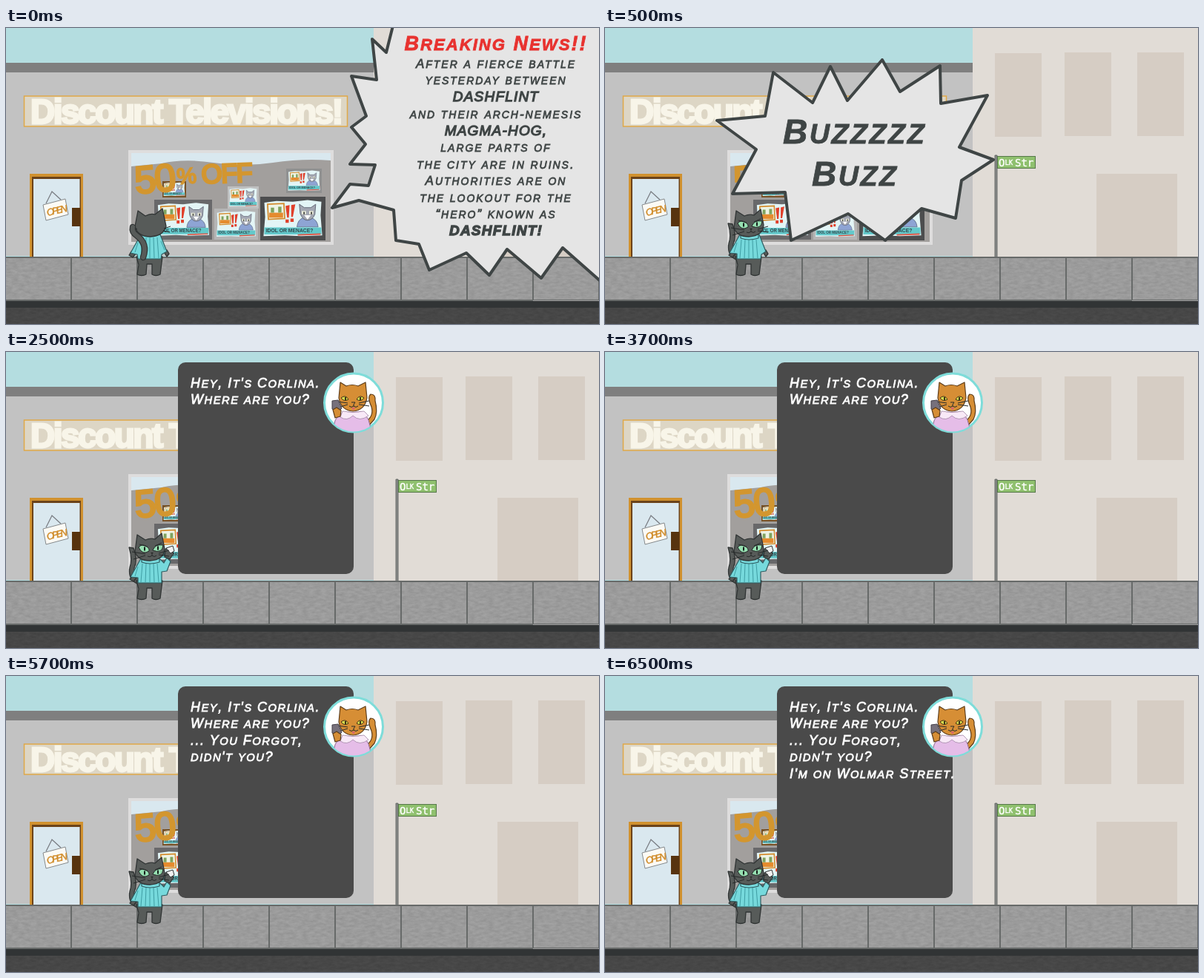
An HTML page for the animation above (8 s loop, 800x400 px).

```html
<!DOCTYPE html>
<html lang="en">
<head>
<meta charset="utf-8">
<title>Street comic</title>
<style>
html, body { margin: 0; width: 100%; height: 100%; overflow: hidden; background: #b4dde0; }
svg { display: block; width: 800px; height: 400px; }
text { font-family: "Liberation Sans", Arial, sans-serif; }
.comic { font-style: italic; letter-spacing: 1.5px; stroke-width: .8; }
.comic tspan { font-size: .82em; }
.mid { text-anchor: middle; }
.dark { fill: #3f4545; stroke: #3f4545; }
.body text { font-size: 17px; letter-spacing: 2px; }
.body .loud { font-size: 19px; letter-spacing: 1.2px; stroke-width: 1.3; }
.call text { font-size: 18px; fill: #fff; stroke: #fff; }
.burst { fill: #e5e5e5; stroke: #3f4545; stroke-width: 4; stroke-linejoin: round; }
.fur { fill: #575b59; stroke: #303434; stroke-width: 1.3; stroke-linejoin: round; }
.knit { fill: #76d9dc; stroke: #2e5c60; stroke-width: 1.2; stroke-linejoin: round; }
.rib { fill: none; stroke: #3f9da3; stroke-width: 1; }
.hair { fill: none; stroke: #262a2a; stroke-width: 1; }
.ginger { fill: #d68e35; stroke: #5d3d1b; stroke-width: 1.2; stroke-linejoin: round; }
.cut { animation: 8s step-end infinite; }
.news { animation-name: news; }
.awake { animation-name: awake; }
.buzz { animation-name: buzz; }
.talk { animation-name: talk; }
.second { animation-name: second; }
.third { animation-name: third; }
@keyframes news { 0% { opacity: 1 } 6.25%, 100% { opacity: 0 } }
@keyframes awake { 0% { opacity: 0 } 6.25%, 100% { opacity: 1 } }
@keyframes buzz { 0% { opacity: 0 } 6.25% { opacity: 1 } 31.25%, 100% { opacity: 0 } }
@keyframes talk { 0% { opacity: 0 } 31.25%, 100% { opacity: 1 } }
@keyframes second { 0% { opacity: 0 } 56.25%, 100% { opacity: 1 } }
@keyframes third { 0% { opacity: 0 } 81.25%, 100% { opacity: 1 } }
</style>
</head>
<body>
<svg viewBox="0 0 800 400" xmlns="http://www.w3.org/2000/svg">
  <defs>
    <filter id="grain" x="0" y="0" width="1" height="1">
      <feTurbulence type="fractalNoise" baseFrequency=".12 .3" numOctaves="4" seed="4"/>
      <feColorMatrix values="0 0 0 0 0  0 0 0 0 0  0 0 0 0 0  1 0 0 0 -.25"/>
    </filter>
    <clipPath id="round"><circle cx="469" cy="68.500" r="39"/></clipPath>
    <g id="show">
      <path d="M5 7L20 5 40 6 58 4 75 6 74 22 76 46 50 47 30 46 4 47 6 24Z" fill="#e3f5f6"/>
      <path d="M9 9L29 8 30 26 10 27Z" fill="#eef3e4" stroke="#d48b2c" stroke-width="1.600"/>
      <path d="M11 19h17v6H11Z" fill="#e58b2e"/>
      <path d="M13 13h4v6h-4ZM22 12h4v7h-4Z" fill="#7fa35e"/>
      <path d="M31 11l5-1-1 15h-2ZM38 10l5-1-3 15h-2ZM31 27h4v4h-4ZM37 26h4v4h-4Z" fill="#e0402b"/>
      <path d="M45 36q1-9 8-11h9q8 2 9 11Z" fill="#8ea4d4" stroke="#59667f" stroke-width=".7"/>
      <path d="M49 20L48 9l6 4h8l6-4-1 12q-3 7-9 7t-9-8Z" fill="#a3a7b2" stroke="#5b6070" stroke-width=".8"/>
      <path d="M54 22h8l-4 5Z" fill="#fff"/>
      <path d="M51 17h5v4h-5ZM60 17h5v4h-5Z" fill="#eef0dc"/>
      <path d="M53 18h1.500v3H53ZM62 18h1.500v3H62Z" fill="#333"/>
      <path d="M5 36.500H75V45H5Z" fill="#63c8ca"/>
      <text x="7" y="42.700" font-size="6.200" font-weight="bold" fill="#33474c">IDOL OR MENACE?</text>
      <path d="M46 45.500l28-1" stroke="#df5747" stroke-width="1.600"/>
    </g>
    <g id="legs">
      <path class="fur" d="M176 309L211 309 208 333Q202 336 197 333L197 319H190L189 333Q183 336 177 333L179 320Z"/>
    </g>
    <g id="face">
      <path class="fur" d="M174 270L177 247 188 254Q195 251 201 253L210 245 214 266Q213 281 194 282 178 282 174 270Z"/>
      <path d="M179 264q4-5 9-2 6 3 5 7-9 6-14-5ZM198 268q3-9 14-7-1 12-14 7Z" fill="#96dfb1" stroke="#202624"/>
      <path d="M187 263.500v5M205 262.500v5" stroke="#17201c" stroke-width="2"/>
      <path d="M195 271h4l-2 2Z" fill="#222"/>
      <path class="hair" d="M197 273v2q-3 3-6 1M197 275q3 3 6 0M188 273L170 270M188 275l-16 5M206 272l14-4M206 274l14 2M180 260l11 3M201 262l9-4"/>
    </g>
  </defs>

  <!-- street -->
  <rect width="800" height="400" fill="#b4dde0"/>
  <rect y="47" width="497" height="13" fill="#7f7f7f"/>
  <rect y="60" width="497" height="248" fill="#c2c2c2"/>
  <rect x="496" width="304" height="310" fill="#e1dcd6"/>
  <path d="M526 34h63v113h-63ZM620 33h63v113h-63ZM718 33h63v113h-63ZM663 197h109v113H663Z" fill="#d6cdc4"/>

  <rect x="24.500" y="92" width="436" height="41" fill="#ddd6c5" stroke="#dfa848" stroke-width="1.500"/>
  <text x="33" y="129" font-size="46" font-weight="bold" letter-spacing="-2.500" fill="#f8f5e9" stroke="#f8f5e9" stroke-width="2.800">Discount Televisions!</text>

  <!-- door -->
  <path d="M32 310V197H104V310Z" fill="#d0912f"/>
  <path d="M35 310V201H101V310Z" fill="#6b431a"/>
  <path d="M37 310V204H99.500V310Z" fill="#dae8ef"/>
  <rect x="89" y="243" width="11" height="25" fill="#57330f"/>
  <path d="M54 237L62 221 74 232" fill="none" stroke="#777b80" stroke-width="1.200"/>
  <path d="M50 239L80 231 84 252 54 260Z" fill="#fbfaf5" stroke="#85898c"/>
  <text transform="translate(56 254) rotate(-13)" font-size="13" font-style="italic" letter-spacing="-2.800" fill="#d18d2b" stroke="#d18d2b" stroke-width=".5">OPEN</text>

  <!-- shop window -->
  <rect x="167" y="167" width="273" height="124" fill="#a29f9d" stroke="#dedddd" stroke-width="4"/>
  <path d="M169 169H438V179Q400 176 360 182T280 182 210 183L169 187Z" fill="#d9e8ef"/>
  <g id="sets"></g>
  <g fill="#d3962f" stroke="#d3962f" stroke-width="3">
    <text transform="translate(175 224) rotate(-5)" font-size="52" letter-spacing="-2">50</text>
    <text transform="translate(231 211) rotate(-4)" font-size="30" stroke-width="2">%</text>
    <text transform="translate(264 210) rotate(-2)" font-size="36" letter-spacing="-1.500">OFF</text>
  </g>

  <!-- street sign -->
  <g class="cut awake">
    <path d="M526 310V172h3V310Z" fill="#8b8d8b" stroke="#525653" stroke-width=".8"/>
    <rect x="529.500" y="173.500" width="51" height="16" fill="#8fc06e" stroke="#56784a"/>
    <text x="531" y="187" font-size="14" fill="#fff" stroke="#fff" stroke-width=".4" style="font-family:'DejaVu Sans Mono',monospace">O<tspan font-size="9" dy="-2">LK</tspan><tspan x="553" dy="2">Str</tspan></text>
  </g>

  <!-- pavement and road -->
  <rect y="309" width="800" height="60" fill="#a2a2a2"/>
  <rect y="309" width="800" height="60" filter="url(#grain)" opacity=".16"/>
  <path id="seams" fill="none" stroke="#676a69" stroke-width="2"/>
  <rect y="369" width="800" height="9" fill="#313435"/>
  <path d="M711 368.500H800" stroke="#a2a2a2"/>
  <rect y="378" width="800" height="22" fill="#4b4b4b"/>
  <rect y="378" width="800" height="22" filter="url(#grain)" opacity=".2"/>

  <!-- cat watching the window -->
  <g class="cut news">
    <use href="#legs"/>
    <path class="fur" d="M169 302l-3 5 5 3 4-5ZM212 301l5 8 3-4-3-5Z"/>
    <path class="knit" d="M182 279L208 279 217 302 210 306 209 312 178 312 177 306 168 304Z"/>
    <path class="rib" d="M184 283l-2 28M189 283l-1 28M194 283v28M199 283l1 28M204 283l2 28M178 290l-4 13M209 288l5 12"/>
    <path class="fur" d="M174 268L178 247 188 254Q195 250 201 252L211 244 216 268Q212 281 195 282 177 282 174 268Z"/>
    <path class="hair" d="M213 271l9-3M212 274l9 2M177 272l-9-5M177 275l-9 1"/>
    <path d="M185 310C190 296 185 287 177 281 171 277 170 273 171 269" fill="none" stroke="#303434" stroke-width="8.500" stroke-linecap="round"/>
    <path d="M185 310C190 296 185 287 177 281 171 277 170 273 171 269" fill="none" stroke="#575b59" stroke-width="6" stroke-linecap="round"/>
  </g>

  <!-- cat facing the street -->
  <g class="cut awake">
    <path class="fur" d="M180 314Q164 309 167 291 171 280 166 264L172 265Q178 280 173 292 172 303 182 307Z"/>
    <use href="#legs"/>
    <path class="fur" d="M171 303l-4 4 5 3 4-5Z"/>
    <g class="cut buzz">
      <path class="fur" d="M212 301l5 8 3-4-3-5Z"/>
      <path class="knit" d="M182 279L208 279 217 302 211 306 210 312 178 312 178 305 168 304Z"/>
    </g>
    <g class="cut talk">
      <path class="knit" d="M182 279L208 280 213 285 217 278 222 283 217 296 210 297 210 312 178 312 178 305 168 304Z"/>
      <path class="fur" d="M214 277L215 266 222 264 226 272 221 280Z"/>
      <path d="M216 265l9-3 2 7-5 3Z" fill="#f1f1f1" stroke="#303434"/>
    </g>
    <path class="rib" d="M184 286l-2 25M189 286l-1 25M194 286v25M199 286l1 25M204 286l2 25M178 290l-4 13"/>
    <path class="knit" d="M183 279H207V284Q194 288 183 284Z"/>
    <use href="#face"/>
  </g>

  <!-- bulletin -->
  <g class="cut news">
    <path class="burst" d="M522 -3L513 33 494 15 500 70 466 65 486 119 466 134 485 157 464 184 498 185 489 213 464 211 440 243 476 233 523 246 526 287 557 292 571 327 621 304 652 334 676 299 722 338 751 297 803 343V-3Z"/>
    <text class="comic mid" x="661" y="30" font-size="27" font-weight="bold" fill="#e8322f" stroke="#e8322f" style="letter-spacing:2px">Breaking News!!</text>
    <g class="body dark">
      <text class="comic mid" x="661" y="54">After a fierce battle</text>
      <text class="comic mid" x="661" y="76">yesterday between</text>
      <text class="comic mid loud" x="661" y="99">DASHFLINT</text>
      <text class="comic mid" x="661" y="122">and their arch-nemesis</text>
      <text class="comic mid loud" x="661" y="145">MAGMA-HOG,</text>
      <text class="comic mid" x="661" y="167">large parts of</text>
      <text class="comic mid" x="661" y="190">the city are in ruins.</text>
      <text class="comic mid" x="661" y="212">Authorities are on</text>
      <text class="comic mid" x="661" y="235">the lookout for the</text>
      <text class="comic mid" x="661" y="257">“hero” known as</text>
      <text class="comic mid loud" x="661" y="280" font-weight="bold">DASHFLINT!</text>
    </g>
  </g>

  <!-- ringing phone -->
  <g class="cut buzz">
    <path class="burst" d="M151 125L216 119 227 60 280 101 304 52 327 98 374 43 398 86 452 51 453 102 516 91 478 161 524 178 481 206 473 257 427 244 378 287 328 251 251 287 243 222 172 224 204 164Z"/>
    <g class="dark" font-size="46" font-weight="bold">
      <text class="comic" x="240" y="156" style="letter-spacing:2.5px">Buzzzzz</text>
      <text class="comic" x="279" y="213" style="letter-spacing:2.5px">Buzz</text>
    </g>
  </g>

  <!-- call -->
  <g class="cut talk">
    <rect x="232" y="14" width="237" height="286" rx="10" fill="#4a4a4a"/>
    <circle cx="469" cy="68.500" r="39.500" fill="#fff" stroke="#7edcd9" stroke-width="3"/>
    <g clip-path="url(#round)">
      <path class="ginger" d="M484 95Q497 87 493 74 487 61 492 57 499 57 498 66 502 81 497 91L489 100Z"/>
      <path d="M442 110Q440 88 455 82L480 81Q492 88 492 110Z" fill="#e5bde8" stroke="#8d6c91"/>
      <path class="ginger" d="M449 62L451 41 459 46Q467 43 475 46L485 41 487 62Q484 79 468 80 452 79 449 62Z"/>
      <path d="M454 80Q468 83 483 80L489 86Q477 95 468 86 460 94 451 88Z" fill="#f8e9f7" stroke="#a184a6" stroke-width=".8"/>
      <path d="M452 62q6-5 10 2-6 4-10-2ZM473 64q4-7 10-2-4 6-10 2Z" fill="#d5d94c" stroke="#463515"/>
      <path d="M458 61v4M478 61v4" stroke="#2d2413" stroke-width="1.800"/>
      <path class="hair" d="M466 68h5l-2 3v2q-3 3-6 0M469 73q3 3 6 0M461 69l-14-2M461 71l-13 4M476 69l14-3M476 71l14 2"/>
      <path d="M466 75h5l-2 4Z" fill="#d9656c"/>
      <path d="M440 66l8-1 5 11-5 5-8-4Z" fill="#77717c" stroke="#443f49"/>
      <path class="ginger" d="M441 78l5-3 6 4-1 8-7 2Z"/>
    </g>
    <g class="call">
      <text class="comic" x="249" y="48">Hey, It's Corlina.</text>
      <text class="comic" x="249" y="70">Where are you?</text>
      <g class="cut second">
        <text class="comic" x="249" y="93">... You Forgot,</text>
        <text class="comic" x="249" y="115">didn't you?</text>
      </g>
      <text class="comic cut third" x="249" y="138">I'm on Wolmar Street.</text>
    </g>
  </g>
</svg>
<script>
const find = id => document.getElementById(id);

// x, y, width, height, frame colour
const sets = [
  [211, 207, 32, 22, '#765126'],
  [200, 232, 78, 54, '#68686a'],
  [299, 214, 42, 30, '#bfc0c0'],
  [281, 244, 59, 42, '#b5b5b5'],
  [343, 228, 88, 59, '#4c4d4e'],
  [378, 190, 48, 33, '#8f9090']
];
find('sets').innerHTML = sets.map(([x, y, w, h, tone]) =>
  `<g transform="translate(${x} ${y}) scale(${w / 80} ${h / 52})">
    <rect width="80" height="52" fill="${tone}"/><use href="#show"/></g>`).join('');

let seams = 'M0 310H800M0 368H800';
for (let i = 1; i < 10; i++) seams += `M${89 * i - 1} 310V368`;
find('seams').setAttribute('d', seams);

// Small capitals for the comic lettering
for (const el of document.querySelectorAll('.comic')) {
  el.innerHTML = el.textContent.replace(/[a-z]+/g, s => `<tspan>${s.toUpperCase()}</tspan>`);
}
</script>
</body>
</html>
```
